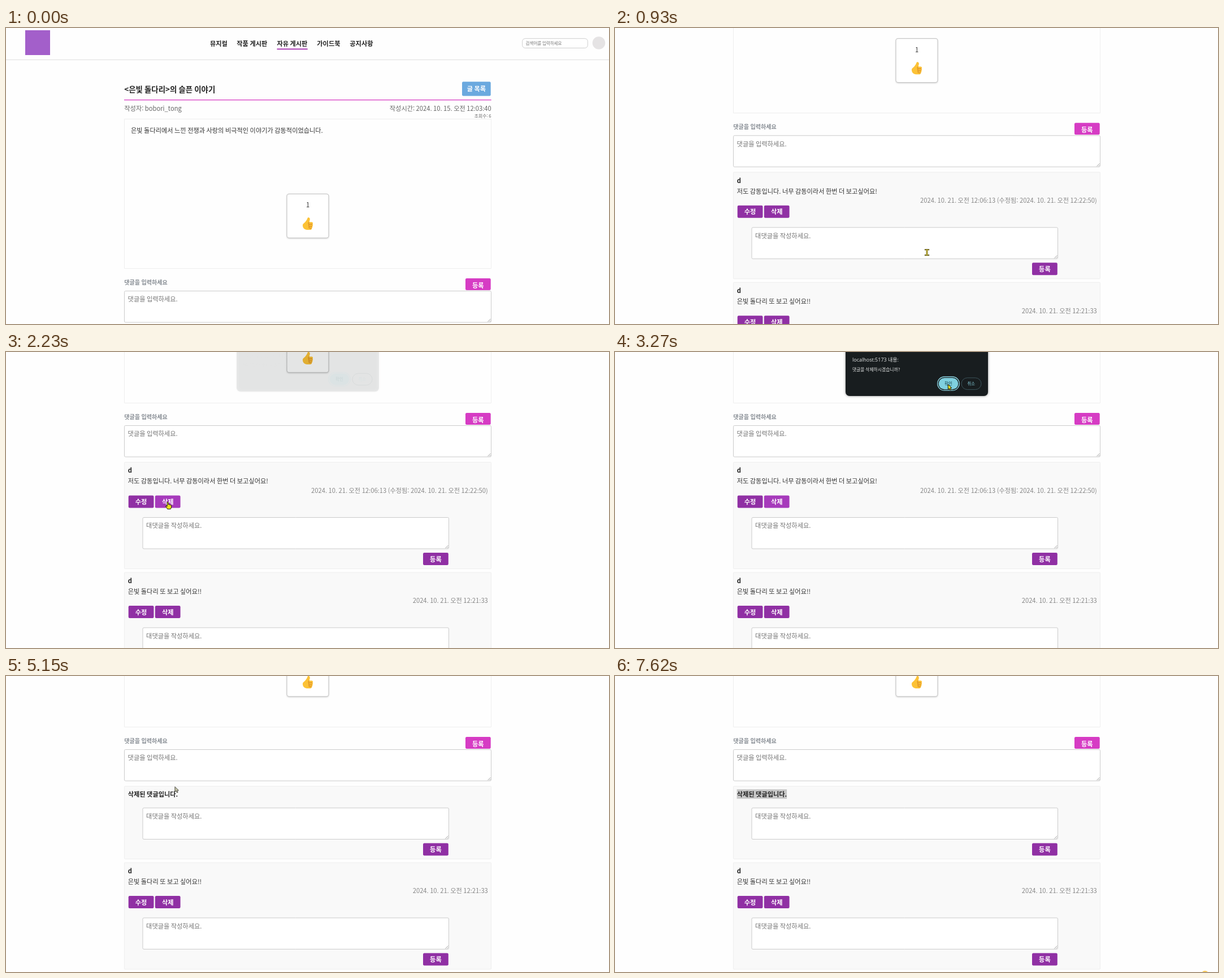
Write an HTML page with a canvas that moves like this. It is 1067 by 525 pixels and loops after 7.69 s.

```html
<!DOCTYPE html>
<html lang="ko">
<head>
<meta charset="utf-8">
<title>게시판</title>
<style>
html, body { margin: 0; width: 100%; height: 100%; overflow: hidden; background: #fff; }
canvas { display: block; width: 1067px; height: 525px; }
</style>
</head>
<body>
<canvas id="stage"></canvas>
<script>
const W = 1067, H = 525, LOOP = 7690;
const KR = '"Noto Sans CJK KR", "Noto Sans CJK", sans-serif';
const UI = '"Open Sans", "Noto Sans CJK KR", "Noto Sans CJK", sans-serif';
const BASE = 11.2;
const PINK = '#d63cc4', PURPLE = '#9030a4', HOVER = '#a63abb';
const SHOW = '은빛 돌다리';
const REMOVED = '삭제된 댓글입니다.';

const canvas = document.getElementById('stage');
const dpr = window.devicePixelRatio || 1;
canvas.width = W * dpr;
canvas.height = H * dpr;
const c = canvas.getContext('2d');

// Time and scroll offset, held until the next entry
const scrollSteps = [[0, 0], [580, 4], [650, 20], [720, 82], [790, 160], [860, 226], [930, 275.7],
  [1000, 304], [1070, 318], [1140, 327], [1210, 332], [1280, 335], [1340, 336]];

// Time, pointer position, pointer shape
const path = [
  [0, 995, 507, 'none'], [70, 995, 507, 'arrow'], [130, 880, 480, 'arrow'], [200, 700, 430, 'arrow'],
  [270, 580, 402, 'arrow'], [320, 552, 398, 'arrow'], [720, 552, 398, 'beam'], [1000, 552, 398, 'beam'],
  [1340, 340, 292, 'beam'], [1410, 338, 290, 'arrow'], [1550, 300, 274, 'hand'], [1640, 285, 264, 'hand'],
  [1760, 286, 266, 'hand'], [2560, 286, 266, 'arrow'], [2980, 562, 86, 'arrow'], [3130, 600, 70, 'arrow'],
  [3270, 589, 57, 'arrow'], [4690, 589, 57, 'pale'], [5150, 299, 196, 'pale'], [5430, 195, 231, 'arrow'],
  [5500, 195, 231, 'arrow'], [6110, 331, 208, 'arrow'], [6250, 331, 208, 'arrow'], [6950, 1020, 508, 'arrow'],
  [7090, 1034, 516, 'arrow'], [7150, 1044, 530, 'none']
];
const presses = [[2090, 2230], [3480, 3680], [5430, 6110], [7620, LOOP]];
const DELETED_AT = 3890;

const clamp = v => Math.max(0, Math.min(1, v));
const ramp = (t, a, b) => clamp((t - a) / (b - a));
const lastAt = (list, t) => list.reduce((k, row, i) => row[0] <= t ? i : k, 0);

function pointerAt(t) {
  const i = lastAt(path, t), a = path[i], b = path[i + 1] || a;
  const k = a === b ? 0 : ramp(t, a[0], b[0]);
  return { x: a[1] + (b[1] - a[1]) * k, y: a[2] + (b[2] - a[2]) * k, kind: a[3] };
}

// cy is the middle of the Hangul letters
function text(s, x, cy, color, { size = BASE, bold = false, align = 'left', font = KR } = {}) {
  c.font = `${bold ? 700 : 400} ${size}px ${font}`;
  c.textAlign = align;
  c.fillStyle = color;
  c.fillText(s, x, cy + size * 0.38);
}

function box(x, y, w, h, r, fill, stroke, line = 1) {
  c.beginPath();
  c.roundRect(x, y, w, h, r);
  if (fill) { c.fillStyle = fill; c.fill(); }
  if (stroke) { c.strokeStyle = stroke; c.lineWidth = line; c.stroke(); }
}

function disc(x, y, r, fill) {
  c.beginPath();
  c.arc(x, y, r, 0, 7);
  c.fillStyle = fill;
  c.fill();
}

function hline(x1, x2, y, color, width) {
  c.fillStyle = color;
  c.fillRect(x1, y - width / 2, x2 - x1, width);
}

function button(label, x, y, w, h, fill, dy = 0) {
  box(x, y, w, h, 2.2, fill);
  text(label, x + w / 2, y + h / 2 + dy, '#fff', { bold: true, align: 'center' });
}

function textarea(x, y, w, hint) {
  box(x + .5, y + .5, w - 1, 55.5, 2, '#fff', '#cbcbcb');
  text(hint, x + 6.6, y + 15, '#757575');
  const r = x + w - 1.5, b = y + 55;
  c.beginPath();
  c.moveTo(r - 5, b); c.lineTo(r, b - 5);
  c.moveTo(r - 2, b); c.lineTo(r, b - 2);
  c.strokeStyle = '#777';
  c.lineWidth = .7;
  c.stroke();
}

function header() {
  box(34, 4, 44, 44, 0, '#a35fca');
  const items = [['뮤지컬', 361], ['작품 게시판', 408.3], ['자유 게시판', 479.4], ['가이드북', 550.3], ['공지사항', 608.3]];
  for (const [label, x] of items) text(label, x, 27.7, '#222', { bold: true });
  hline(479.5, 533.7, 37.4, '#a32cae', 1.8);
  box(913.7, 18.7, 115.6, 16.8, 5, '#fff', '#c9c9c9', .9);
  text('검색어를 입력하세요', 919.6, 27.3, '#757575', { size: 7.5 });
  disc(1049, 26.5, 11.3, '#e5e3e4');
  hline(0, W, 56.3, '#dedede', 1);
}

function thumb(x, y) {
  c.save();
  c.translate(x, y);
  c.fillStyle = '#fcc236';
  c.fill(new Path2D('M-9 3C-9 0-6-1-4.5-3C-2.5-5.5-1-7.5-.4-10C.2-11.8 3.6-11.3 3.8-8.2C3.9-6 2.8-4.4 2.8-2.8L7-2.8C9.4-2.6 9.4.2 8.4 1C9.4 2 9.2 4 8 4.6C8.7 5.8 8.2 7.4 7.1 7.9C7.5 10 6 11 4 11L0 11C-5 11-9 8.5-9 3Z'));
  c.strokeStyle = '#d98a27';
  c.lineWidth = 1.1;
  c.stroke(new Path2D('M2.6-2.6C.6-1.6.6.6 2.4 1.1H8M2.4 1.1C1.2 2.4 1.4 4.2 2.6 4.6H7.6M2.6 4.6C1.6 6 1.8 7.5 3 7.9H6.8'));
  c.restore();
}

function article() {
  text(`<${SHOW}>의 슬픈 이야기`, 209.3, 108.7, '#222', { size: 13.44, bold: true });
  button('글 목록', 807, 95.3, 50.7, 25.2, '#6ba9df');
  hline(209, 858.7, 127.6, PINK, 1.3);
  text('작성자: bobori_tong', 209.3, 142.5, '#666');
  text('작성시간: 2024. 10. 15. 오전 12:03:40', 858.7, 142.5, '#666', { align: 'right' });
  text('조회수: 6', 858.7, 156.2, '#666', { size: 7.84, align: 'right' });
  box(209.5, 161.5, 649, 265, 0, '#fefefe', '#eee');
  text(`${SHOW}에서 느낀 전쟁과 사랑의 비극적인 이야기가 감동적이었습니다.`, 221, 181.8, '#333');

  c.save();
  c.shadowColor = 'rgba(0,0,0,.2)';
  c.shadowBlur = 3;
  c.shadowOffsetY = 1.2;
  box(497, 294.3, 74, 78, 4, '#fff');
  c.restore();
  box(497, 294.3, 74, 78, 4, null, '#c8c8c8', 1.2);
  text('1', 534, 314, '#333', { align: 'center' });
  thumb(534, 347);

  text('댓글을 입력하세요', 209.3, 451, '#868c93', { size: 10.08, bold: true });
  button('등록', 813, 444, 44.7, 21, PINK, 2.3);
  textarea(209, 466, 650, '댓글을 입력하세요.');
}

function replyForm(y) {
  textarea(241.5, y, 542.5, '대댓글을 작성하세요.');
  button('등록', 738, y + 63, 44.8, 22, PURPLE, .4);
}

function comment(y, body, time, hover) {
  box(209.5, y + .5, 649, 189, 1, '#f9f9f9', '#eee');
  text('d', 215.7, y + 15, '#222', { bold: true });
  text(body, 215.7, y + 34, '#333');
  text(time, 852.8, y + 50.5, '#888', { align: 'right' });
  button('수정', 216.7, y + 59.5, 44.8, 22, PURPLE, .3);
  button('삭제', 263.8, y + 59.5, 44.8, 22, hover ? HOVER : PURPLE, .3);
  replyForm(y + 98);
}

function removedComment(y, t, pointer) {
  box(209.5, y + .5, 649, 129, 1, '#f9f9f9', '#eee');
  const line = color => text(REMOVED, 215.7, y + 15, color, { bold: true });
  line('#222');
  if (t >= 5500) {
    const reach = t < 6110 ? pointer.x - 215.7 : 1e3;
    const width = n => c.measureText(REMOVED.slice(0, n)).width;
    let n = 0;
    while (n < REMOVED.length && width(n) + 5 < reach) n++;
    const blurred = t >= 7620;
    c.save();
    c.beginPath();
    c.rect(215.6, y + 6, width(n), 16.8);
    c.clip();
    c.fillStyle = blurred ? '#c8c8c8' : '#0078d7';
    c.fillRect(209, y, 300, 40);
    line(blurred ? '#222' : '#fff');
    c.restore();
  }
  replyForm(y + 38.5);
}

function dialog(t) {
  const show = ramp(t, 2205, 2440), hide = ramp(t, 3660, 3820);
  const alpha = show * show * (3 - 2 * show) * (1 - hide);
  if (alpha <= 0) return;
  c.save();
  c.globalAlpha = Math.max(alpha, .08 * (1 - hide));
  c.translate(0, -9 * (1 - show) ** 1.2 - 8 * hide);
  c.shadowColor = 'rgba(0,0,0,.45)';
  c.shadowBlur = 4;
  box(408, -20, 252, 98, 7, '#181d1f');
  c.shadowColor = 'transparent';
  text('localhost:5173 내용:', 420, 14, '#e6e8e8', { size: 9, font: UI });
  text('댓글을 삭제하시겠습니까?', 420, 30.8, '#e6e8e8', { size: 7.8 });
  box(570.7, 44, 38.6, 24.2, 12.1, null, '#8ed6e3', 1.3);
  box(572.6, 45.9, 34.8, 20.4, 10.2, '#7fd0df');
  text('확인', 590, 56, '#123f49', { size: 7.5, align: 'center' });
  box(613, 45.8, 35, 20.8, 10.4, null, '#3f5a61', .9);
  text('취소', 630.3, 56, '#84cbd9', { size: 7.5, align: 'center' });
  c.restore();
}

const shapes = {
  arrow: new Path2D('M.3.3V9.3L2.4 7.5L3.9 10.8L5.5 10.1L4.1 6.9H6.9Z'),
  hand: new Path2D('M-.9.8Q.2-.6 1.3.8V4.6Q2.5 3.9 3.3 5Q4.5 4.4 5.2 5.7Q6.8 5.3 6.8 7Q7 10.3 5.2 12.6H-.3Q-1.4 10.3-3.4 8Q-3.5 6.2-1.8 7L-.9 7.9Z')
};

function drawPointer({ x, y, kind }, pressed) {
  if (pressed) disc(x, y, 7.2, 'rgba(247,193,60,.85)');
  if (kind === 'none') return;
  c.save();
  c.translate(x, y);
  if (kind === 'beam') {
    const bars = pad => {
      c.fillRect(-3.5 - pad, -5.2 - pad, 7 + 2 * pad, .8 + 2 * pad);
      c.fillRect(-3.5 - pad, 4.4 - pad, 7 + 2 * pad, .8 + 2 * pad);
      c.fillRect(-.7 - pad, -5 - pad, 1.4 + 2 * pad, 10 + 2 * pad);
    };
    c.fillStyle = '#2b2808';
    bars(.6);
    c.fillStyle = '#e6cf2c';
    bars(0);
  } else {
    const shape = shapes[kind] || shapes.arrow;
    c.fillStyle = kind === 'pale' ? '#c4c3a4' : '#e9e01c';
    c.strokeStyle = kind === 'pale' ? '#4d4d48' : '#1c1c10';
    c.lineWidth = 1;
    c.lineJoin = 'round';
    c.fill(shape);
    c.stroke(shape);
  }
  c.restore();
}

function draw(t) {
  const scroll = scrollSteps[lastAt(scrollSteps, t)][1];
  const pointer = pointerAt(t);
  const deleted = t >= DELETED_AT;
  c.setTransform(dpr, 0, 0, dpr, 0, 0);
  c.fillStyle = '#fefefe';
  c.fillRect(0, 0, W, H);
  c.save();
  c.translate(0, -scroll);
  header();
  article();
  if (deleted) removedComment(531, t, pointer);
  else comment(531, '저도 감동입니다. 너무 감동이라서 한번 더 보고싶어요!',
    '2024. 10. 21. 오전 12:06:13 (수정됨: 2024. 10. 21. 오전 12:22:50)', t >= 1550);
  comment(deleted ? 666.5 : 726.5, `${SHOW} 또 보고 싶어요!!`, '2024. 10. 21. 오전 12:21:33', false);
  c.restore();
  dialog(t);
  drawPointer(pointer, presses.some(([a, b]) => t >= a && t < b));
}

const start = performance.now();
function tick() {
  draw((performance.now() - start) % LOOP);
  requestAnimationFrame(tick);
}
tick();
</script>
</body>
</html>
```
